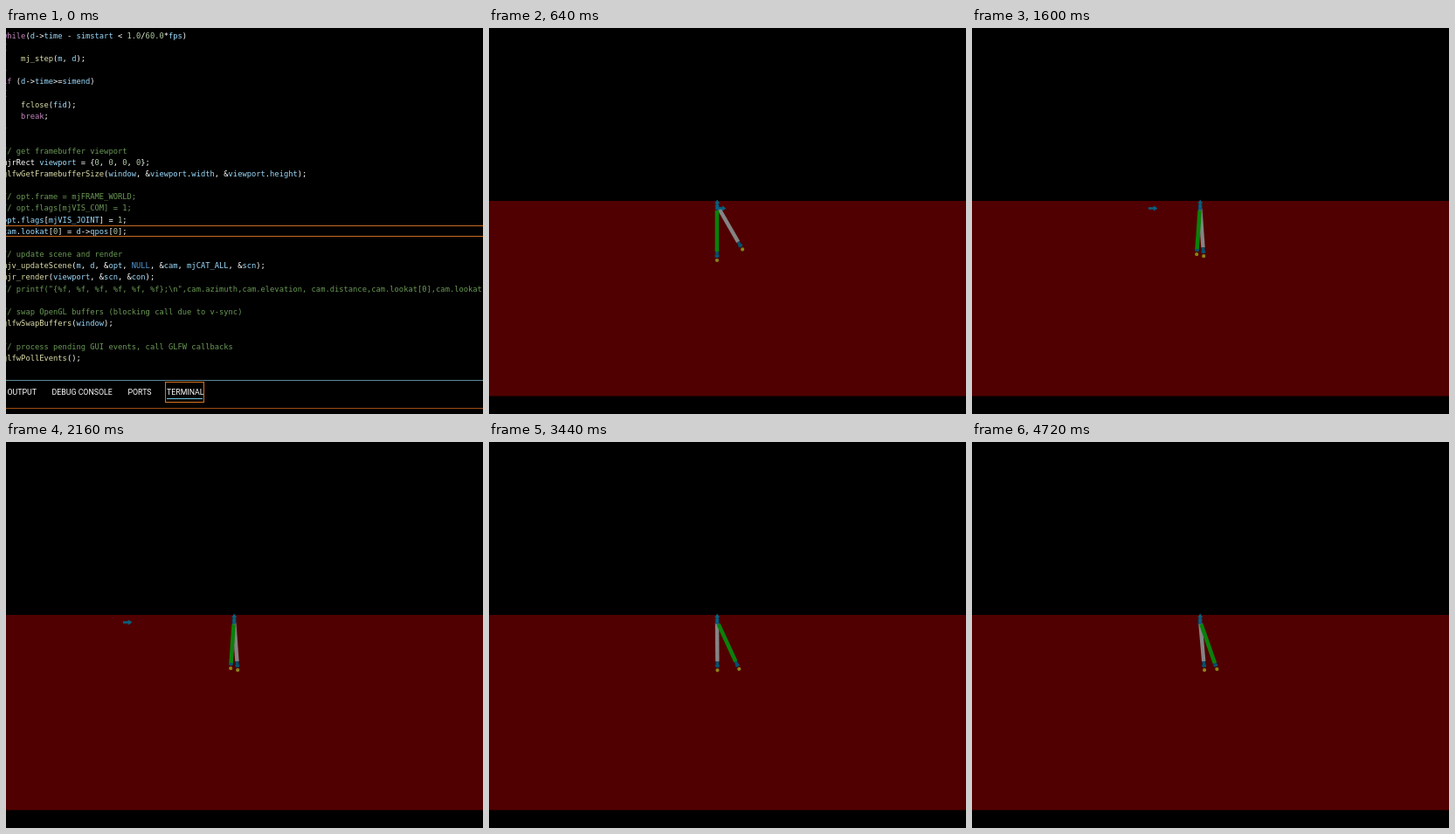
Animation, 546 px wide and 442 px high, one loop 4.8 s. Source, as an HTML page with a canvas:

```html
<!DOCTYPE html>
<html>
<head>
<meta charset="utf-8">
<style>
  html, body { margin: 0; width: 100%; height: 100%; overflow: hidden; background: #000; }
  canvas { display: block; }
</style>
</head>
<body>
<canvas id="stage" width="546" height="442"></canvas>
<script>
const ctx = document.getElementById('stage').getContext('2d');
const LOOP = 4800, FRAME = 80, SCENE_START = 640;

// ---------- editor ----------
const CODE = `while(d->time - simstart < 1.0/60.0*fps)
{
    mj_step(m, d);
}
if (d->time>=simend)
{
    fclose(fid);
    break;
}

// get framebuffer viewport
mjrRect viewport = {0, 0, 0, 0};
glfwGetFramebufferSize(window, &viewport.width, &viewport.height);

// opt.frame = mjFRAME_WORLD;
// opt.flags[mjVIS_COM] = 1;
opt.flags[mjVIS_JOINT] = 1;
cam.lookat[0] = d->qpos[0];

// update scene and render
mjv_updateScene(m, d, &opt, NULL, &cam, mjCAT_ALL, &scn);
mjr_render(viewport, &scn, &con);
// printf("{%f, %f, %f, %f, %f, %f};\\n",cam.azimuth,cam.elevation, cam.distance,cam.lookat[0],cam.lookat[1]);

// swap OpenGL buffers (blocking call due to v-sync)
glfwSwapBuffers(window);

// process pending GUI events, call GLFW callbacks
glfwPollEvents();`.split('\n');

const TOKENS = /\/\/.*|[A-Za-z_]\w*|\d+(\.\d+)?|[^\w\s]+/g;

function tokenColor(token, next) {
  if (token.startsWith('//')) return '#6a9955';
  if (/^(while|if|break)$/.test(token)) return '#c586c0';
  if (token === 'NULL') return '#569cd6';
  if (/^\d/.test(token)) return '#b5cea8';
  if (token === 'mjrRect' || /^\W/.test(token)) return '#ffffff';
  return next === '(' ? '#dcdcaa' : '#9cdcfe';
}

function drawEditor() {
  ctx.font = '8.77px "DejaVu Sans Mono", monospace';
  const charWidth = ctx.measureText('m').width;
  CODE.forEach((line, row) => {
    for (const match of line.matchAll(TOKENS)) {
      const token = match[0];
      ctx.fillStyle = tokenColor(token, line[match.index + token.length]);
      ctx.fillText(token, -4 + match.index * charWidth, 11.7 + row * 13.18);
    }
  });

  ctx.fillStyle = '#c86a20';
  ctx.fillRect(0, 226, 546, 1);
  ctx.fillRect(0, 238, 546, 1);
  ctx.fillStyle = '#5a8a98';
  ctx.fillRect(0, 403, 546, 1);
  ctx.fillStyle = '#a04c14';
  ctx.fillRect(0, 435, 546, 1);

  ctx.font = '8.8px Roboto, sans-serif';
  ctx.fillStyle = '#fff';
  [['OUTPUT', 1.5], ['DEBUG CONSOLE', 52.5], ['PORTS', 139.5], ['TERMINAL', 184]]
    .forEach(([label, x]) => ctx.fillText(label, x, 420));
  ctx.fillStyle = '#6fc3df';
  ctx.fillRect(184, 424, 41, 1);
  ctx.strokeStyle = '#d87420';
  ctx.lineWidth = 1;
  ctx.strokeRect(182.5, 405.5, 44, 23);
}

// ---------- walker ----------
const HIP_X = 261;
const BLUE = '#06506e';
const GREEN_LEG = { hipY: 205, length: 61, color: '#0b800b', width: 4.6 };
const GRAY_LEG = { hipY: 203, length: 58.3, color: '#848484', width: 4.4 };

// Heel strikes; the swinging leg alternates, green first.
const STRIKES = [1480, 1760, 2040, 2320, 2600, 2880, 3250, 3595, 3900, 4230, 4560, 4960];
// Marker left behind at the starting point: [time, x].
const MARKER = [[640, 266], [1120, 254], [1600, 207], [1680, 202], [2160, 139],
                [2240, 133], [2800, 61], [2880, 47], [3300, -8]];

function lerpKeys(keys, t) {
  for (let i = 1; i < keys.length; i++) {
    const [t0, v0] = keys[i - 1], [t1, v1] = keys[i];
    if (t <= t1) return v0 + (v1 - v0) * (t - t0) / (t1 - t0);
  }
  return keys[keys.length - 1][1];
}

// Angles in degrees from straight down, positive forward.
function pose(t) {
  if (t < STRIKES[0]) {
    const green = -13 * ((t - SCENE_START) / (STRIKES[0] - SCENE_START)) ** 4;
    return { green, gray: green + 30, greenLift: 0, grayLift: 0 };
  }
  // A strike instant still shows the finished step.
  let step = 0;
  while (step < STRIKES.length - 2 && t > STRIKES[step + 1]) step++;
  const since = t - STRIKES[step];
  const stance = 17 - 30 * since / (STRIKES[step + 1] - STRIKES[step]);
  const swing = stance + 30 * Math.tanh((since - 134) / 50);
  const lift = 7 * Math.exp(-(((since - 110) / 50) ** 2));
  return step % 2 === 0
    ? { green: swing, gray: stance, greenLift: lift, grayLift: 0 }
    : { green: stance, gray: swing, greenLift: 0, grayLift: lift };
}

function segment(y0, y1, width, color) {
  ctx.fillStyle = color;
  ctx.fillRect(-width / 2, y0, width, y1 - y0);
}

function drawLeg(leg, degrees, lift) {
  const end = leg.length - lift;
  ctx.save();
  ctx.translate(HIP_X, leg.hipY);
  ctx.rotate(-degrees * Math.PI / 180);
  segment(end - 10, end - 3, 3.6, BLUE);
  segment(4, Math.min(leg.length - 10, end - 4), leg.width, leg.color);
  segment(end - 6, end - 4, 5, BLUE);
  ctx.fillStyle = '#8a8318';
  ctx.beginPath();
  ctx.arc(0, end, 2.1, 0, Math.PI * 2);
  ctx.fill();
  ctx.restore();
}

function drawArrow(x, y, angle) {
  ctx.save();
  ctx.translate(x, y);
  ctx.rotate(angle);
  ctx.fillStyle = '#08607e';
  ctx.fillRect(-5, -1.3, 7, 2.6);
  ctx.beginPath();
  ctx.moveTo(1, -3);
  ctx.lineTo(5.5, 0);
  ctx.lineTo(1, 3);
  ctx.fill();
  ctx.restore();
}

function drawWalker(t) {
  ctx.fillStyle = '#500000';
  ctx.fillRect(0, 198, 546, 223.5);
  const p = pose(t);
  drawLeg(GRAY_LEG, p.gray, p.grayLift);
  drawLeg(GREEN_LEG, p.green, p.greenLift);
  ctx.fillStyle = BLUE;
  ctx.fillRect(HIP_X - 2, 202, 4.4, 6.5);
  drawArrow(HIP_X + 0.2, 202, -Math.PI / 2);
  drawArrow(lerpKeys(MARKER, t), 206.5, 0);
}

// ---------- loop ----------
const start = performance.now();

function render() {
  const t = Math.floor((performance.now() - start) % LOOP / FRAME) * FRAME;
  ctx.fillStyle = '#000';
  ctx.fillRect(0, 0, 546, 442);
  if (t < SCENE_START) drawEditor();
  else drawWalker(t);
  requestAnimationFrame(render);
}
render();
</script>
</body>
</html>
```
